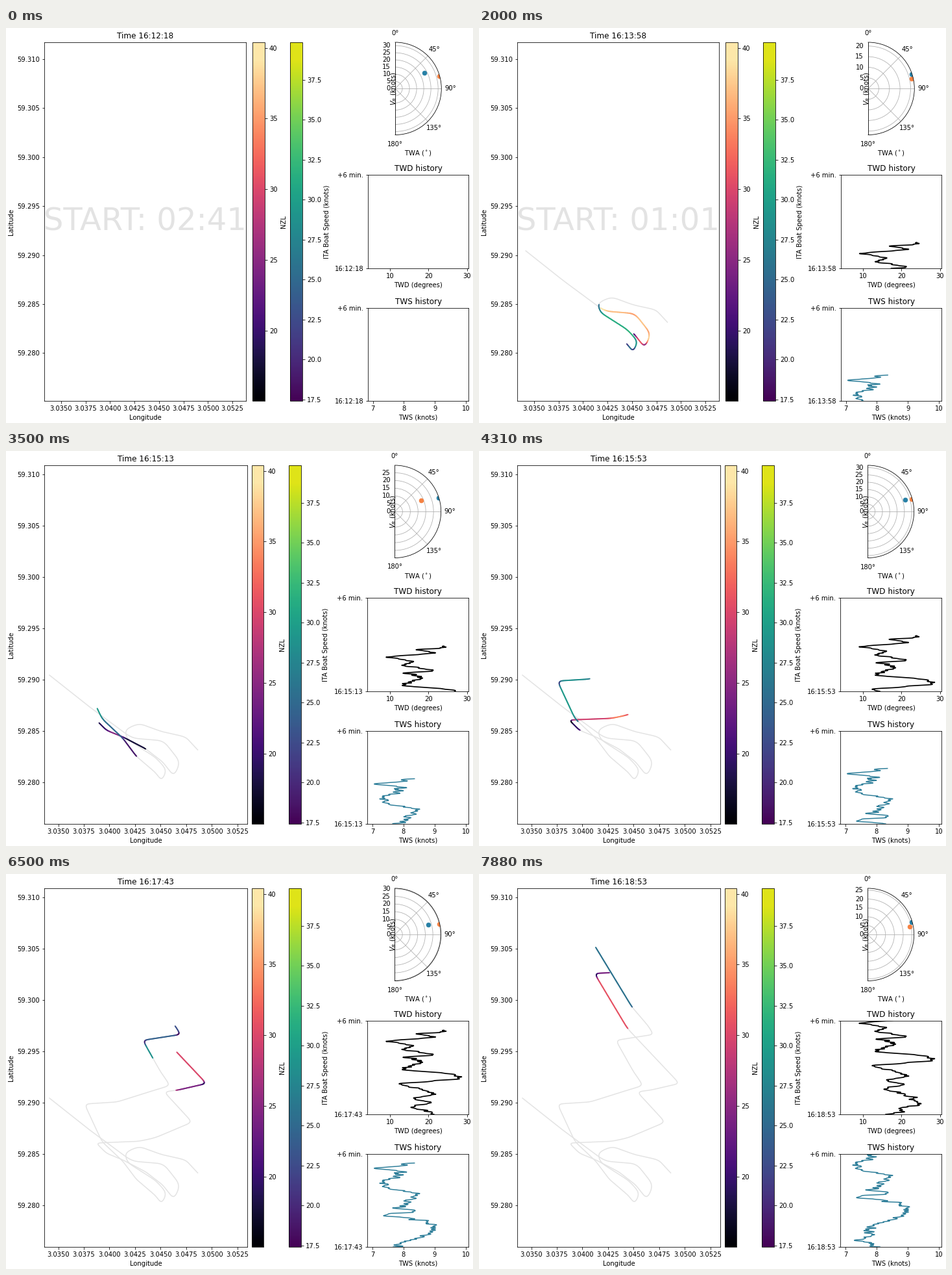
A matplotlib script for the animation above (8 s loop, 720x608 px).

```python
import numpy as np
import matplotlib.pyplot as plt
from matplotlib.animation import FuncAnimation
from matplotlib.cm import ScalarMappable
from matplotlib.collections import LineCollection
from matplotlib.colors import ListedColormap, Normalize

W, H, DPI = 720, 608, 72
FRAMES, INTERVAL = 100, 80
STEP, END = 5, 395                # seconds of race time per update, last second
TRAIL, SPAN = 50, 360             # coloured trail and history length, seconds
CLOCK0, TO_START = 16 * 3600 + 12 * 60 + 18, 161
KNOTS = 12                        # knots per chart pixel per second
BLUE, DEEP_BLUE, ORANGE, PALE = "#2780a6", "#2f7f9a", "#f58142", "#e3e3e3"
TOP, BOTTOM, LEFT = 22, 574, 59.3

plt.rcParams["font.family"] = "DejaVu Sans"
seconds = np.arange(END + 1)

# Corners of each course as (time, x, y); turns are rounded by smoothing
NZL_CORNERS = [
    (0, 67, 345), (29, 127.6, 393), (52, 194, 442), (68, 243, 446),
    (81.5, 269, 479), (88.5, 259, 501), (99, 242, 479), (125, 215.5, 458.5),
    (152, 180, 440), (165, 155, 430), (179, 139, 414), (206, 205, 411.5),
    (215, 230, 406), (241, 287, 382), (268, 243.5, 335), (275, 263, 333),
    (298.5, 309, 322.5), (345, 229, 238), (383.5, 178, 153), (395, 201, 152)]
ITA_CORNERS = [
    (0, 295.5, 460), (14, 277, 440), (28, 240, 432), (41, 205, 419),
    (49, 183, 429), (56, 187, 444), (76, 231, 472), (85.5, 248, 491),
    (92.5, 240, 508), (99, 231, 495.5), (125, 201, 470), (147, 180, 442),
    (168, 148, 412), (194, 121, 354), (215, 171, 351), (233, 207, 339.5),
    (253, 253, 325.5), (265, 238, 304), (288, 211, 256), (317, 269, 247),
    (325, 261, 234), (345, 236, 205), (395, 180, 113)]

# (time, true wind angle in degrees)
NZL_TWA = [(0, 74), (100, 77), (175, 67), (215, 74), (265, 61), (325, 76.5),
           (395, 79)]
ITA_TWA = [(0, 62), (100, 72), (395, 74)]

# Main swings of the wind: (time, degrees) and (time, knots)
TWD_SWINGS = [
    (0, 24), (5, 25.6), (14, 17), (27, 21.5), (43, 9), (60, 17), (75, 13),
    (95, 22.5), (104, 13), (118, 18.4), (152, 13.2), (168, 25.5), (188, 28),
    (207, 12), (228, 18.8), (246, 21.5), (266, 15.2), (280, 21), (294, 15.5),
    (325, 22.5), (360, 24.5), (372, 19.3), (385, 20), (395, 16.4)]
TWS_SWINGS = [
    (0, 8.35), (12, 7.75), (20, 7), (30, 7.95), (48, 7.9), (72, 7.2),
    (100, 7.6), (115, 8.4), (140, 8.3), (175, 7.8), (185, 8.5), (200, 7.25),
    (222, 8.7), (250, 9), (268, 8.95), (292, 8.4), (330, 7.7), (355, 7.8),
    (370, 7.4), (395, 8)]


def keyed(points):
    """Linear value per second for every column after the time."""
    t, *columns = zip(*points)
    return [np.interp(seconds, t, c) for c in columns]


def smooth(values, width):
    window = np.hanning(width + 2)[1:-1]
    padded = np.pad(values, width // 2, mode="reflect", reflect_type="odd")
    return np.convolve(padded, window / window.sum(), mode="valid")


def wind(swings, gust, seed):
    noise = np.random.default_rng(seed).normal(0, gust, len(seconds))
    noise[0] = 0
    return smooth(keyed(swings)[0] + noise, 5)


def clock(t):
    s = CLOCK0 + t
    return f"{s // 3600}:{s // 60 % 60:02d}:{s % 60:02d}"


def rect(left, right, top, bottom):
    return [left / W, 1 - bottom / H, (right - left) / W, (bottom - top) / H]


def pixel_text(x, y, text, **kw):
    return fig.text(x / W, 1 - y / H, text, ha="center", va="center", **kw)


def capped(name):
    """A named colour map that stays level near its bright end."""
    return ListedColormap(
        plt.get_cmap(name)(np.minimum(np.linspace(0, 1, 256), 0.95)))


fig = plt.figure(figsize=(W / DPI, H / DPI), dpi=DPI, facecolor="white")
unit = [0, 0, 1, 1]

# Chart
chart = fig.add_axes(unit, label="chart")
chart.set_xlabel("Longitude")
chart.set_ylabel("Latitude")
chart.set_xticks(3.035 + 0.0025 * np.arange(8))
chart.set_yticks(59.28 + 0.005 * np.arange(7))
chart.xaxis.set_major_formatter("{x:.4f}")
chart.yaxis.set_major_formatter("{x:.3f}")
title = chart.set_title("")
countdown = chart.text(0.5, (BOTTOM - 312) / (BOTTOM - TOP), "", fontsize=48,
                       color=PALE, ha="center", va="baseline", zorder=1,
                       transform=chart.transAxes)

# Speed scales
magma, viridis = capped("magma"), capped("viridis")
NZL_SCALE, ITA_SCALE = Normalize(15.03, 40.4), Normalize(17.4, 39.86)


def scale(name, norm, cmap, ticks, fmt, label):
    ax = fig.add_axes(unit, label=name)
    bar = fig.colorbar(ScalarMappable(norm, cmap), cax=ax, ticks=ticks,
                       format=fmt)
    bar.set_label(label)
    return ax


nzl_bar = scale("nzl", NZL_SCALE, magma, np.arange(20, 41, 5), "%d", "NZL")
ita_bar = scale("ita", ITA_SCALE, viridis, np.arange(17.5, 38, 2.5), "%.1f",
                "ITA Boat Speed (knots)")

# Polar plot of boat speed against wind angle
polar = fig.add_axes(rect(564.4, 706.9, 22, 164.5), projection="polar")
polar.set_theta_zero_location("N")
polar.set_theta_direction(-1)
polar.set_thetamin(0)
polar.set_thetamax(180)
polar.set_thetagrids(range(0, 181, 45))
speed_label = pixel_text(598, 93, "$V_B$ (knots)", rotation=90)
angle_label = pixel_text(635.5, 193, r"TWA ($^\circ$)")


class Boat:
    def __init__(self, corners, twa, norm, cmap, color):
        x, y = keyed(corners)
        legs = x + 1j * y
        course = smooth(legs, 11)
        self.path = np.column_stack([3.035 + (course.real - 80.5) / 15780,
                                     59.31 - (course.imag - 36.3) / 15780])
        # Only half of the pace cut off by a turn is lost
        steady = smooth(np.abs(np.gradient(legs)), 11)
        self.speed = KNOTS * (steady + np.abs(np.gradient(course))) / 2
        self.twa = np.radians(keyed(twa)[0])
        self.wake, = chart.plot([], [], color=PALE, lw=1.5, zorder=2)
        self.trail = LineCollection([], norm=norm, cmap=cmap, lw=2,
                                    capstyle="round", zorder=3)
        chart.add_collection(self.trail, autolim=False)
        self.dot, = polar.plot([], [], "o", color=color, ms=6.5)

    def draw(self, t):
        self.wake.set_data(*self.path[:t + 1].T)
        self.trail.set_visible(t > 0)
        if t:
            lo = max(0, t - TRAIL)
            p = self.path[lo:t + 1]
            self.trail.set_segments(np.stack([p[:-1], p[1:]], axis=1))
            self.trail.set_array(self.speed[lo + 1:t + 1])
        self.dot.set_data([self.twa[t]], [self.speed[t]])


nzl = Boat(NZL_CORNERS, NZL_TWA, NZL_SCALE, magma, ORANGE)
ita = Boat(ITA_CORNERS, ITA_TWA, ITA_SCALE, viridis, BLUE)


class History:
    def __init__(self, name, unit_name, values, ticks, xlim, **style):
        self.ax = fig.add_axes(unit, label=name)
        self.ax.set_title(f"{name} history")
        self.ax.set_xlabel(f"{name} ({unit_name})")
        self.ax.set(xlim=xlim, ylim=(0, SPAN), xticks=ticks)
        self.values = values
        self.line, = self.ax.plot([], [], **style)

    def draw(self, t):
        self.line.set_data(self.values[:t + 1], t - seconds[:t + 1])
        self.ax.set_yticks([0, SPAN], labels=[clock(t), "+6 min."])


twd = History("TWD", "degrees", wind(TWD_SWINGS, 1.2, 3), [10, 20, 30],
              (4.18, 30.45), color="black", lw=1.7)
tws = History("TWS", "knots", wind(TWS_SWINGS, 0.2, 8), [7, 8, 9, 10],
              (6.84, 10.09), color=DEEP_BLUE, lw=1.5)


def lay_out(before_start):
    """The panels shift a little once the countdown is gone."""
    if before_start:
        right, bar1, bar2, side, shift = 370, 380.3, 438.3, 558, 0
        px, x0, y0 = 15080, 85, 48
    else:
        right, bar1, bar2, side, shift = 372, 378.5, 436.5, 557.2, -0.6
        px, x0, y0 = 15780, 80.5, 36.3
    chart.set_position(rect(LEFT, right, TOP, BOTTOM))
    chart.set_xlim(3.035 + (LEFT - x0) / px, 3.035 + (right - x0) / px)
    chart.set_ylim(59.31 - (BOTTOM - y0) / px, 59.31 - (TOP - y0) / px)
    nzl_bar.set_position(rect(bar1, bar1 + 18.5, TOP, BOTTOM))
    ita_bar.set_position(rect(bar2, bar2 + 18.5, TOP, BOTTOM))
    twd.ax.set_position(rect(side, 713.2, 226.5, 370))
    tws.ax.set_position(rect(side, 713.2, 431, 574))
    polar.set_position(rect(564.4 + shift, 706.9 + shift, 22, 164.5))
    speed_label.set_x((598 + shift) / W)
    angle_label.set_x((635.5 + shift) / W)


def update(i):
    t = (4 * i + 3) // 5 * STEP   # four updates in every five frames
    left = TO_START - t
    lay_out(left >= 0)
    countdown.set_text(f"START: {left // 60:02d}:{left % 60:02d}"
                       if left >= 0 else "")
    title.set_text(f"Time {clock(t)}")
    for part in (nzl, ita, twd, tws):
        part.draw(t)
    fastest = 1.01 * max(nzl.speed[t], ita.speed[t])
    polar.set_yticks(np.arange(0, fastest, 5))
    polar.set_ylim(0, fastest)
    return []


anim = FuncAnimation(fig, update, frames=FRAMES, interval=INTERVAL,
                     repeat=True, repeat_delay=0, blit=False)
plt.show()
```
